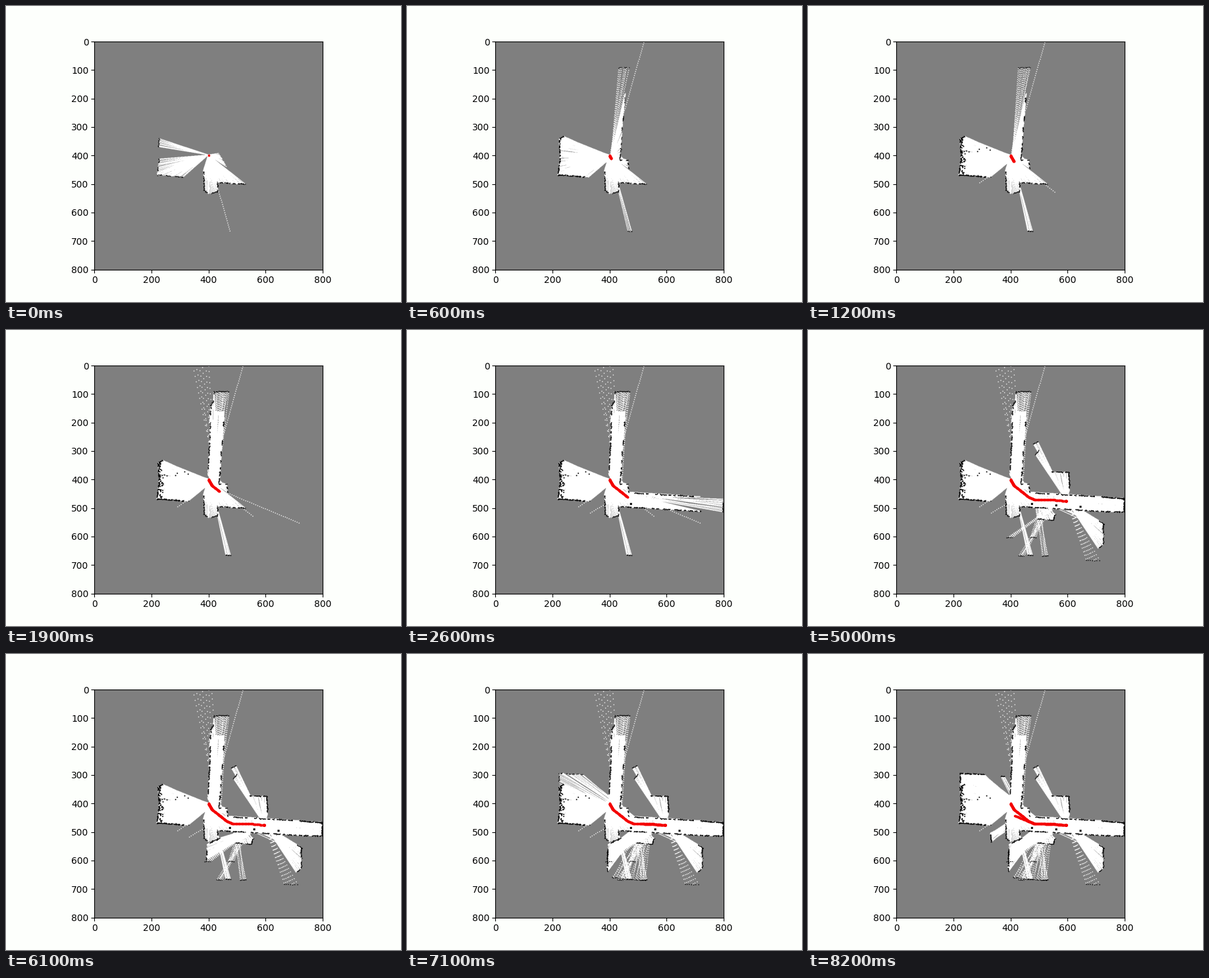
Animation, 600 px wide and 450 px high, one loop 8300 ms. Source, as a matplotlib script:

```python
import numpy as np
import matplotlib.pyplot as plt
from matplotlib.animation import FuncAnimation

FRAMES, STEP_MS, SIZE = 83, 100, 800
UNKNOWN, FREE, WALL = 127, 255, 0

rng = np.random.default_rng(4)
free_cells = [[] for _ in range(FRAMES)]
wall_cells = [[] for _ in range(FRAMES)]


def pose(t):
    """Robot position: out along the corridor, a turn on the spot, and back."""
    key_t = [0, 12, 26, 30, 37, 45, 62, 74, 82]
    x = np.interp(t, key_t, [400, 412, 464, 482, 535, 596, 596, 480, 416])
    y = np.interp(t, key_t, [400, 421, 462, 470, 470, 476, 476, 470, 443])
    return np.array([x, y])


def cells(points, width):
    """Flat indices of the width x width blocks around the points."""
    off = np.arange(width) - width // 2
    base = np.floor(points).astype(int)
    x = base[:, 0, None, None] + off[:, None]
    y = base[:, 1, None, None] + off
    x, y = np.broadcast_arrays(x, y)
    ok = (x >= 0) & (x < SIZE) & (y >= 0) & (y < SIZE)
    return np.unique(y[ok] * SIZE + x[ok])


def along(points, pitch):
    """Points about one pitch apart on a polyline."""
    p = np.array(points, float)
    s = np.r_[0, np.cumsum(np.hypot(*np.diff(p, axis=0).T))]
    u = np.linspace(0, s[-1], int(s[-1] / pitch) + 2)
    return np.c_[np.interp(u, s, p[:, 0]), np.interp(u, s, p[:, 1])]


def ray(t, tip, gap=7.5):
    """Free cells from the robot to tip; a wide gap gives a dotted ray."""
    eye = pose(t)
    d = np.hypot(*(tip - eye))
    r = np.arange(0, d, gap)[:, None]
    free_cells[t].append(cells(eye + (tip - eye) * r / d, 3 if gap > 1 else 2))


def scan(t0, t1, outline, pitch=1.6, hit=0.65):
    """Rays to a wall, arriving in random order; wall cells come in dashes."""
    tips = along(outline, pitch)
    n = len(tips)
    tips += rng.normal(0, 0.9, (n, 2))
    dash = np.repeat(rng.random(n // 5 + 1) < hit, 5)[:n]
    times = rng.permutation(np.linspace(t0, t1, n).astype(int))
    for tip, t, black in zip(tips, times, dash):
        ray(t, tip, 1.5 * pitch if pitch >= 4 else 0.8)
        if black:
            wall_cells[t].append(cells(tip[None], 3))


# First scan, then the left room and the hall
scan(0, 0, [(228, 343), (226, 372)], 3.5, 1)
scan(0, 0, [(228, 415), (220, 470), (310, 477)], 3)
scan(0, 0, [(385, 450), (384, 524), (400, 536), (432, 530), (432, 497), (528, 503)], 1.8)
scan(0, 0, [(462, 440), (437, 396)], 2, 0)
scan(1, 9, [(240, 335), (224, 345), (228, 410), (220, 470), (330, 478)], 1)
scan(1, 8, [(437, 418), (466, 418), (466, 447)])
scan(3, 10, [(461, 668), (479, 668)], 3, 1)

# North corridor
scan(2, 9, [(428, 94), (470, 94)], 5, 1)
scan(3, 10, [(455, 185), (437, 418)], hit=0.5)
scan(13, 20, [(422, 94), (470, 94)], 5, 1)
scan(13, 20, [(420, 165), (456, 165)], 1, 0)
scan(13, 22, [(420, 94), (418, 130), (409, 140), (405, 260), (398, 385)], hit=0.5)
scan(14, 20, [(345, -4), (412, -4)], 13, 0)

# East corridor and the alcove below it
scan(20, 26, [(466, 448), (720, 463)], hit=0.5)
scan(20, 26, [(470, 499), (720, 514)], hit=0.55)
scan(20, 26, [(798, 470), (798, 516)], 3)
scan(28, 36, [(720, 463), (798, 470), (798, 516), (720, 514)], 1)
scan(30, 36, [(495, 540), (550, 545), (556, 525)], hit=0.8)
scan(30, 37, [(722, 575), (728, 560)], 3, 1)

# Narrow views below the alcove, from right to left
for k, x in enumerate(np.linspace(522, 397, 4)):
    depth = 605 if k % 2 else 670
    scan(30 + 4 * k, 33 + 4 * k, [(x - 9, depth), (x + 9, depth)], 4, 1)

# Rooms seen from the far end
scan(44, 48, [(545, 376), (605, 376), (607, 440)], hit=0.8)
scan(46, 50, [(480, 278), (497, 270)], 3, 1)
scan(46, 50, [(488, 315), (500, 300)], 3, 1)
scan(46, 50, [(712, 548), (725, 556), (726, 630), (708, 643)], 2.2, 0.75)
scan(46, 50, [(665, 686), (712, 686)], 9, 1)
scan(51, 60, [(440, 524), (397, 545), (393, 600)])

# Seen on the way back
scan(66, 72, [(410, 660), (460, 668), (528, 672)], 5)
scan(69, 72, [(394, 560), (393, 640)])
scan(70, 78, [(226, 340), (224, 297), (310, 300)], 1, 0.8)
scan(76, 79, [(368, 306), (380, 308)], 2, 0.8)
scan(78, 82, [(330, 506), (334, 538)], 1.2)

# Single long rays
for t, tip in [(0, (476, 668)), (6, (523, -3)), (8, (556, 531)),
               (8, (290, 500)), (16, (722, 556)), (22, (332, 520))]:
    ray(t, np.array(tip))

# Pillars in the corridor and clutter in the left room
for k in range(3):
    wall_cells[22 + 10 * k].append(cells(np.array([[475 + 85 * k, 487 + 5 * k]]), 7))
clutter = np.c_[229 + np.abs(rng.normal(0, 6, 45)), rng.uniform(345, 468, 45)]
wall_cells[8].append(cells(clutter, 4))
wall_cells[8].append(cells(rng.uniform((250, 360), (350, 390), (5, 2)), 4))


def build_maps():
    grid = np.full(SIZE * SIZE, UNKNOWN, np.uint8)
    walls = np.zeros(SIZE * SIZE, bool)
    maps = []
    for free, hits in zip(free_cells, wall_cells):
        for idx in free:
            grid[idx] = FREE
        for idx in hits:
            walls[idx] = True
        maps.append(np.where(walls, WALL, grid).reshape(SIZE, SIZE))
    return maps


maps = build_maps()

fig = plt.figure(figsize=(6, 4.5), dpi=100, facecolor="#fdfffc")
ax = fig.add_subplot(facecolor=str(UNKNOWN / 255))
image = ax.imshow(maps[0], cmap="gray", vmin=0, vmax=255, extent=(0, SIZE, SIZE, 0))
trail, = ax.plot([], [], "o", color="#f40000", ms=2.6, mew=0)
ax.set_xlim(0, SIZE)
ax.set_ylim(SIZE, 0)
ax.set_xticks(range(0, 801, 200))
ax.set_yticks(range(0, 801, 100))
ax.tick_params(axis="y", pad=2.8)


def update(i):
    image.set_data(maps[i])
    trail.set_data(*pose(np.linspace(0, i, 4 * i + 1)))
    return image, trail


anim = FuncAnimation(fig, update, frames=FRAMES, init_func=lambda: update(0),
                     interval=STEP_MS, repeat=True, repeat_delay=0)
plt.show()
```
